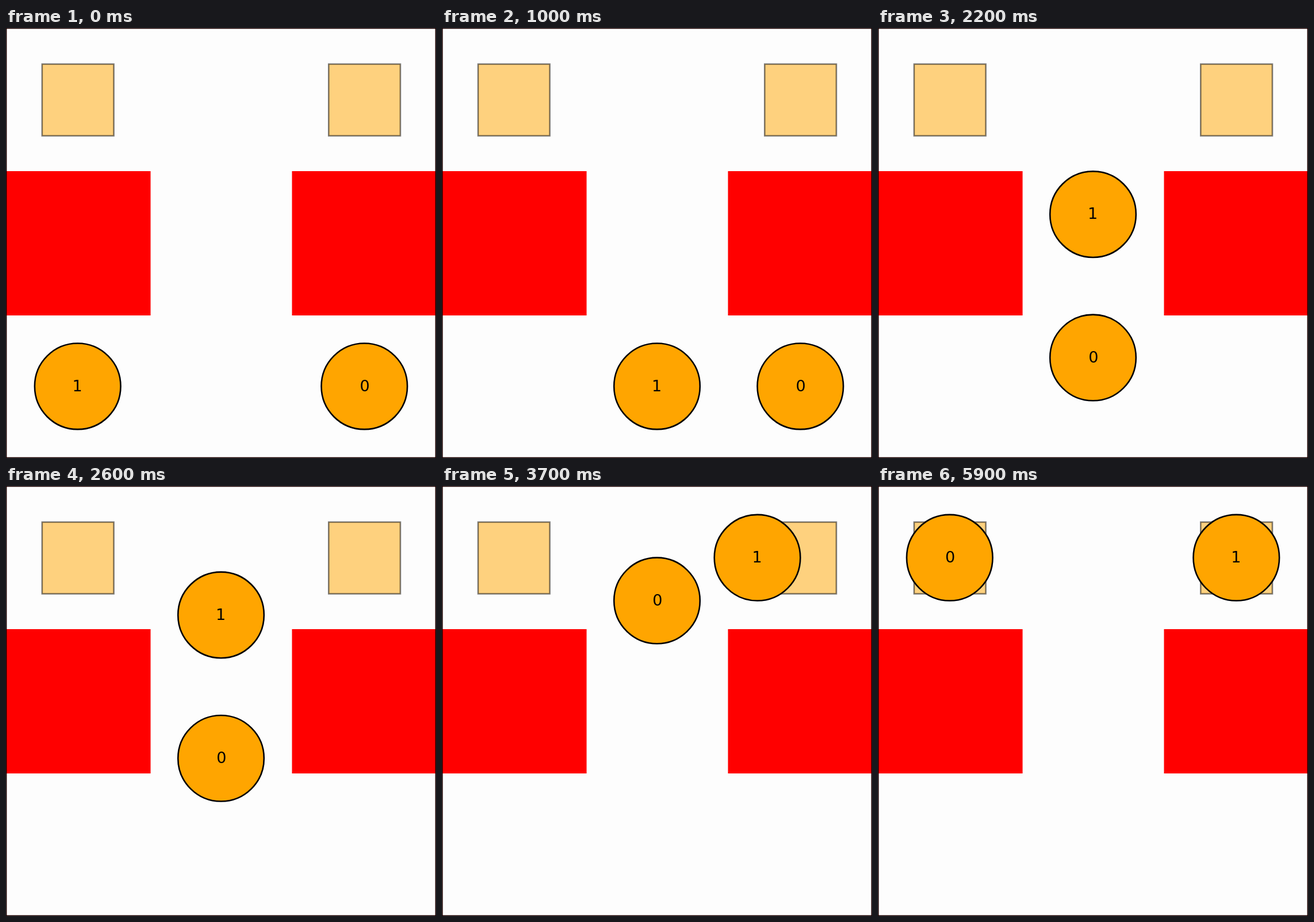
Animation of 748x748 px, one loop 6000 ms. Source, as an HTML page:

```html
<!DOCTYPE html>
<html lang="en">
<head>
<meta charset="utf-8">
<title>Two agents on a grid</title>
<style>
  html, body { margin: 0; width: 100%; height: 100%; overflow: hidden; background: #fdfdfd; }
  svg { display: block; width: 100vw; height: 100vh; }
  .goal { fill: orange; fill-opacity: .5; stroke: #000; stroke-opacity: .5; stroke-width: 2.6; }
  .wall { fill: #f00; }
  .edge { fill: none; stroke: #1c0000; stroke-width: 2.7; }
  circle { fill: orange; stroke: #000; stroke-width: 2.6; }
  text { font: 27px "DejaVu Sans", sans-serif; text-anchor: middle; }
</style>
</head>
<body>
<svg viewBox="0 0 748 748">
  <rect class="goal" x="62.8" y="62.8" width="124.7" height="124.7"/>
  <rect class="goal" x="561.3" y="62.8" width="124.7" height="124.7"/>
  <rect class="wall" x="0" y="249" width="251.5" height="251"/>
  <rect class="wall" x="497.5" y="249" width="250.5" height="251"/>
  <rect class="edge" width="748" height="748"/>
  <g id="a0"><circle r="74.8"/><text x=".8" y="8.2">0</text></g>
  <g id="a1"><circle r="74.8"/><text x="-.5" y="8.2">1</text></g>
</svg>
<script>
  const CELL = 748 / 3, LOOP = 6000, TICK = 100;

  // Grid cell [column, row] at each whole second
  const agents = [
    { id: "a0", path: [[2, 2], [2, 2], [1, 2], [1, 1], [1, 0], [0, 0], [0, 0]] },
    { id: "a1", path: [[0, 2], [1, 2], [1, 1], [1, 0], [2, 0], [2, 0], [2, 0]] }
  ];
  for (const a of agents) a.node = document.getElementById(a.id);

  const start = performance.now();

  function draw(now) {
    const t = Math.max(0, now - start) % LOOP;
    const tick = Math.floor(t / TICK);
    const step = Math.floor(tick / 10), part = tick % 10 / 10;
    for (const { node, path } of agents) {
      const [x, y] = path[step].map((from, i) =>
        (from + (path[step + 1][i] - from) * part + .5) * CELL);
      node.setAttribute("transform", `translate(${x} ${y})`);
    }
    requestAnimationFrame(draw);
  }
  draw(start);
</script>
</body>
</html>
```
